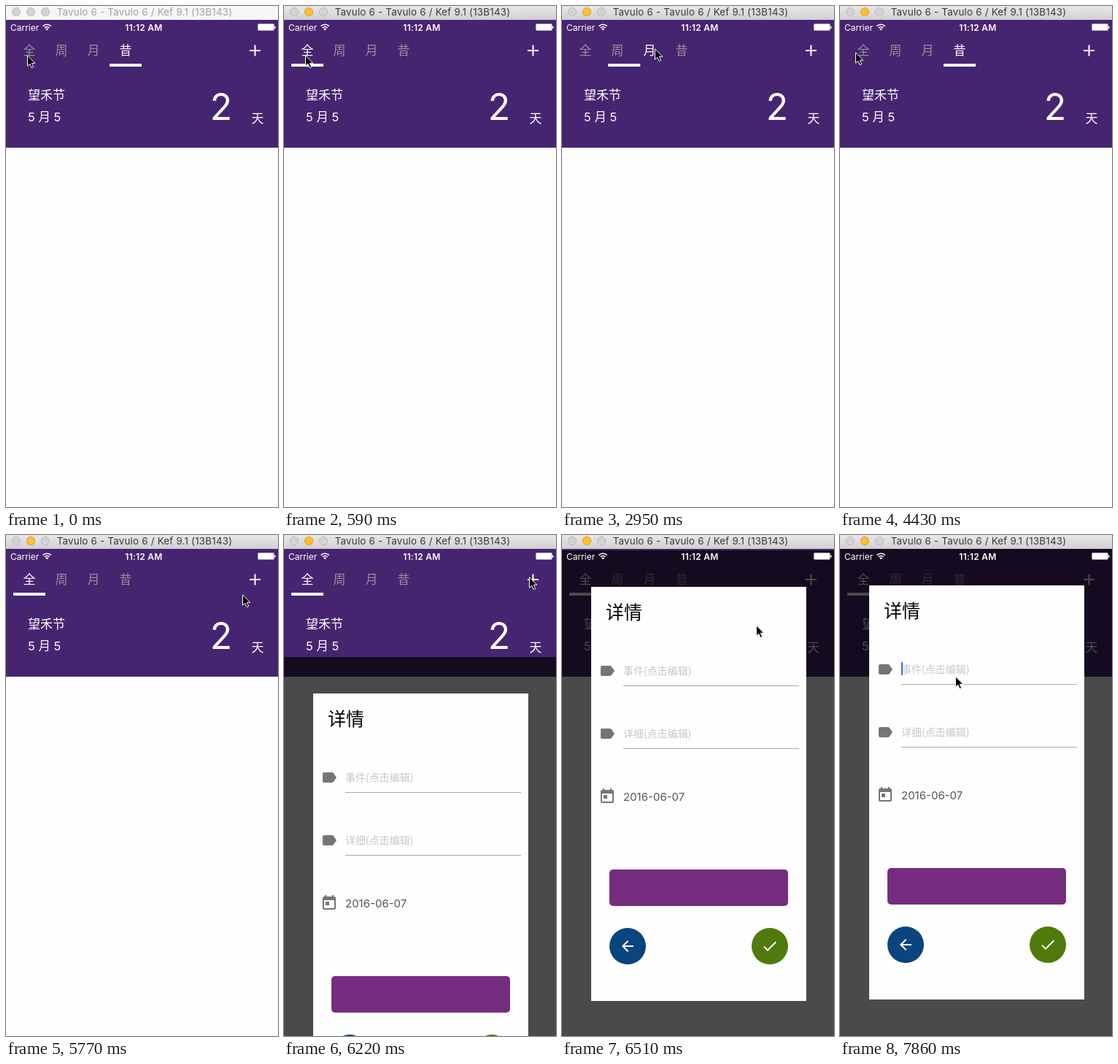
These frames come from a looping animation (373 px wide and 686 px high, 8000 ms). An HTML page:

```html
<!DOCTYPE html>
<html lang="zh-CN">
<head>
<meta charset="utf-8">
<style>
html, body { margin: 0; width: 100%; height: 100%; overflow: hidden; background: #fefefe; }
svg { display: block; width: 373px; height: 686px; }
text { font-family: Inter, "Noto Sans CJK SC", "Noto Sans CJK", sans-serif; }
.cjk { font-family: "Noto Sans CJK SC", "Noto Sans CJK", sans-serif; font-weight: 300; }
.mid { text-anchor: middle; }
.hint { font-size: 14px; fill: #c7c7cc; }
</style>
</head>
<body>
<svg viewBox="0 0 373 686">
  <defs>
    <linearGradient id="chrome" x2="0" y2="1">
      <stop stop-color="#e9e7e9"/><stop offset="1" stop-color="#d1cfd1"/>
    </linearGradient>
    <g id="field">
      <path transform="translate(50 172)" fill="#757575" d="M17.63 5.84C17.27 5.33 16.67 5 16 5H5a2 2 0 0 0-2 2v10a2 2 0 0 0 2 2h11c.67 0 1.27-.33 1.63-.84L22 12z"/>
      <path d="M84 204.5h241" stroke="#a9a9a9"/>
    </g>
  </defs>

  <!-- Countdown list -->
  <rect width="373" height="686" fill="#fefefe"/>
  <rect y="19" width="373" height="175" fill="#462570"/>
  <g id="tabs" font-size="17"></g>
  <rect id="bar" y="79" width="44" height="4" fill="#fff"/>
  <path d="M334 61h15M341.5 53.5v15" stroke="#fff" stroke-width="2"/>
  <g fill="#fff">
    <text class="cjk" x="30" y="128" font-size="17">望禾节</text>
    <text x="30" y="158" font-size="16.5">5 月 5</text>
    <text class="mid" x="295" y="156" font-size="50">2</text>
    <text class="cjk" x="336.5" y="159.5" font-size="17">天</text>
  </g>

  <!-- Detail dialog -->
  <g id="dialog">
    <rect y="19" width="373" height="686" fill-opacity=".705"/>
    <rect x="40" y="69" width="295" height="567" fill="#fefefe"/>
    <text class="cjk" x="60" y="113" font-size="25" style="font-weight:400">详情</text>
    <use href="#field"/>
    <use href="#field" y="86"/>
    <text class="cjk hint" x="84" y="189">事件(点击编辑)</text>
    <text class="cjk hint" x="84" y="275">详细(点击编辑)</text>
    <path transform="translate(50 344)" fill="#757575" d="M19 3h-1V1h-2v2H8V1H6v2H5a2 2 0 0 0-2 2v14a2 2 0 0 0 2 2h14a2 2 0 0 0 2-2V5a2 2 0 0 0-2-2zm0 16H5V8h14zM7 10h5v5H7z"/>
    <text x="84" y="361.5" font-size="15" fill="#555">2016-06-07</text>
    <rect x="65" y="456" width="245" height="50" rx="5" fill="#742d7e"/>
    <circle cx="90" cy="561" r="25" fill="#0a457e"/>
    <circle cx="285" cy="561" r="25" fill="#517a0c"/>
    <path d="M98 561H84M90.7 553.7L83.4 561l7.3 7.3M277 561.6l5 5L293.3 555.3" fill="none" stroke="#fff" stroke-width="2"/>
    <rect id="caret" x="84" y="174" width="2" height="18" fill="#426bf2"/>
  </g>

  <!-- Status bar -->
  <g fill="#fff" font-size="12">
    <text x="6" y="33.5">Carrier</text>
    <text class="mid" x="189" y="33.5" font-weight="600" letter-spacing=".25">11:12 AM</text>
    <path d="M50.6 27.6a8 8 0 0 1 11.2 0M52.8 30a5 5 0 0 1 6.8 0" fill="none" stroke="#fff" stroke-width="1.6"/>
    <path d="M56.2 33.6l-2-2.2a3 3 0 0 1 4 0z"/>
    <rect x="345.5" y="24.5" width="22" height="9" rx="1" fill="none" stroke="#fff" stroke-opacity=".6"/>
    <rect x="346" y="25" width="21" height="8" rx=".5"/>
    <rect x="368" y="27.5" width="1.5" height="3.5" rx=".7"/>
  </g>

  <!-- Window title -->
  <rect id="frame" width="373" height="19"/>
  <g fill="#d4d2d4" stroke="#bdbbbd">
    <circle cx="14" cy="8" r="5.6"/>
    <circle id="light" cx="34" cy="8" r="5.6"/>
    <circle cx="54" cy="8" r="5.6"/>
  </g>
  <text id="title" class="mid" x="190" y="13" font-size="13.4" letter-spacing=".2">Tavulo 6 - Tavulo 6 / Kef 9.1 (13B143)</text>

  <path id="cursor" d="M.5 .8V15.2L3.8 12.2 6.2 17.6 8.7 16.5 6.3 11.3H10.8Z" stroke="#fff"/>
</svg>
<script>
const LOOP = 8000, TICK = 148.1, LEAD = 12;
const $ = id => document.getElementById(id);
const set = (id, attrs) => {
  for (const name in attrs) $(id).setAttribute(name, attrs[name]);
};
const mix = (a, b, p) => a + (b - a) * p;
const ease = p => {
  p = Math.min(1, Math.max(0, p));
  return p * p * (3 - 2 * p);
};
const tabLeft = i => 10 + 44 * i;

$('tabs').innerHTML = [...'全周月昔'].map((name, i) =>
  `<text class="cjk mid" x="${tabLeft(i) + 22}" y="67">${name}</text>`).join('');

// Times in seconds
const taps = [
  { at: 0.385, tab: 0 }, { at: 1.12, tab: 1 }, { at: 2.903, tab: 2 },
  { at: 3.79, tab: 3 }, { at: 4.68, tab: 0 }
];
const glides = [
  { at: 0.74, dur: 0.44, x: 69, y: 67 },
  { at: 1.49, dur: 0.45, x: 116, y: 46 },
  { at: 1.95, dur: 0.3, x: 35, y: 52 },
  { at: 2.25, dur: 0.7, x: 127, y: 58 },
  { at: 2.97, dur: 0.13, x: 185, y: 57 },
  { at: 3.15, dur: 0.38, x: 169, y: 61 },
  { at: 3.86, dur: 0.57, x: 21, y: 63 },
  { at: 4.7, dur: 0.6, x: 230, y: 277 },
  { at: 5.3, dur: 0.6, x: 336, y: 57 },
  { at: 6.23, dur: 0.28, x: 266, y: 123 },
  { at: 6.52, dur: 0.44, x: 175, y: 205 },
  { at: 7.12, dur: 0.44, x: 158, y: 193 }
];
const OPEN = 6.056, CARET = 7.8;

function draw(now) {
  // The screen is refreshed in steps
  const t = Math.floor((now % LOOP + LEAD) / TICK) * TICK / 1000;

  const active = t >= taps[0].at;
  set('frame', { fill: active ? 'url(#chrome)' : '#f6f6f6' });
  set('light', active ? { fill: '#fdbe30', stroke: '#e0a028' } : { fill: '#d4d2d4', stroke: '#bdbbbd' });
  set('title', { fill: active ? '#3a3a3a' : '#a2a2a2' });

  let tab = 3, left = tabLeft(tab);
  for (const tap of taps) if (t >= tap.at) {
    tab = tap.tab;
    left = mix(left, tabLeft(tab), ease((t - tap.at) / 0.2));
  }
  [...$('tabs').children].forEach((el, i) => el.setAttribute('fill', i === tab ? '#fff' : '#959099'));
  set('bar', { x: left });

  // Critically damped rise from below the screen
  const u = 17.4 * (t - OPEN);
  const drop = Math.round(667 * (1 + u) * Math.exp(-u));
  set('dialog', { visibility: u > 1 ? 'visible' : 'hidden', transform: `translate(0 ${drop})` });
  set('caret', { opacity: t >= CARET ? 1 : 0 });

  let x = 29, y = 67;
  for (const g of glides) {
    const p = ease((t - g.at) / g.dur);
    x = mix(x, g.x, p);
    y = mix(y, g.y, p);
  }
  set('cursor', { transform: `translate(${Math.round(x)} ${Math.round(y)})` });
  requestAnimationFrame(draw);
}
draw(0);
</script>
</body>
</html>
```
